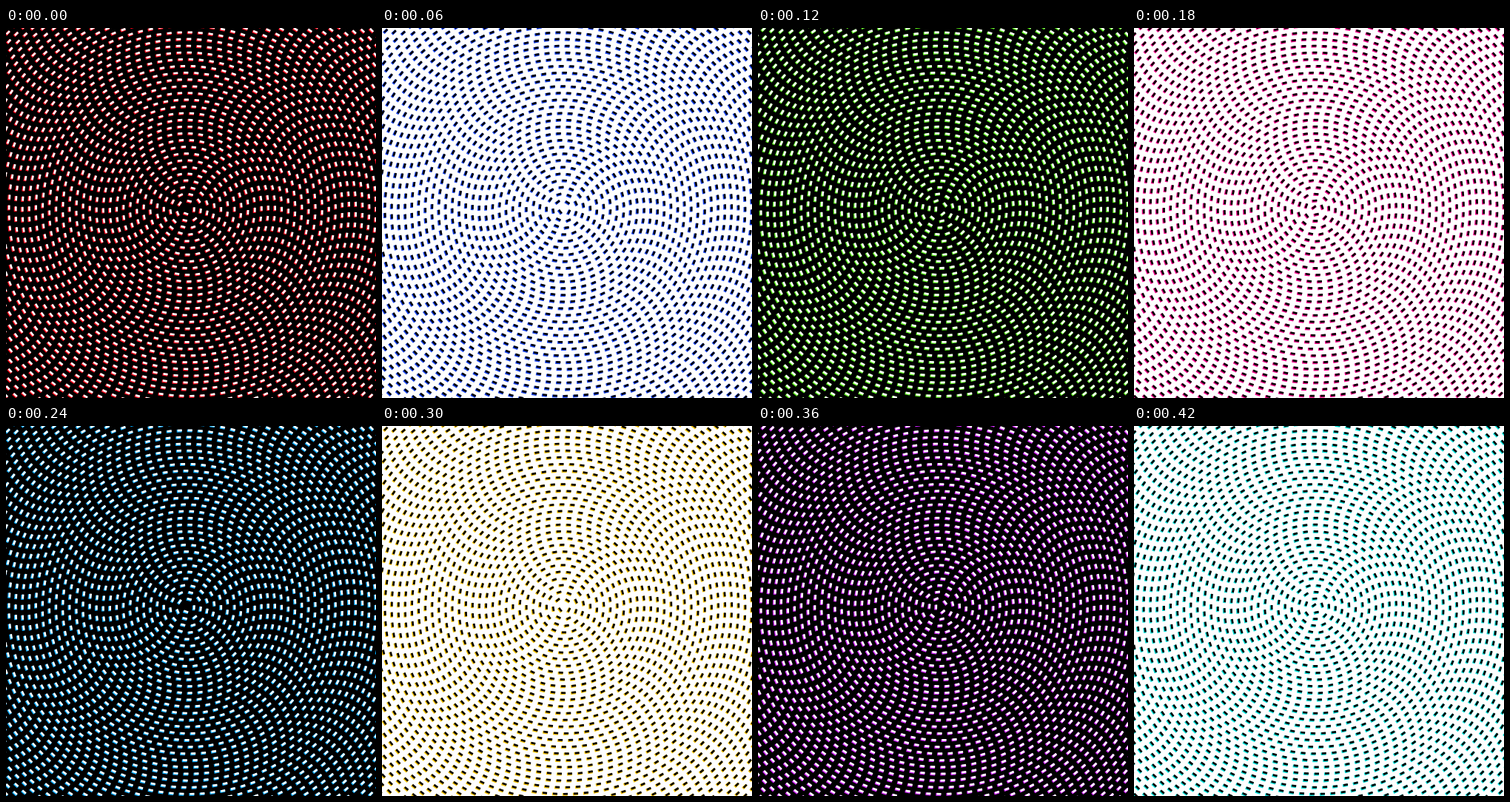
Animation of 500 by 500 pixels, one loop 480 ms. Source, as an HTML page with a canvas:

```html
<!DOCTYPE html>
<html lang="en">
<head>
<meta charset="utf-8">
<title>Dashed spiral</title>
<style>
  html, body { margin: 0; width: 100%; height: 100%; overflow: hidden; background: #000; }
  canvas { display: block; width: 500px; height: 500px; }
</style>
</head>
<body>
<canvas id="stage" width="500" height="500"></canvas>
<script>
const ctx = document.getElementById('stage').getContext('2d');
const CENTER = 245;
const PITCH = 9.1;          // distance between turns
const TURN_RATE = 0.7;      // dash k sits at 0.7 * sqrt(k) turns
const STEP_MS = 60;
const FRINGES = ['#ff0018', '#1a48ff', '#58f018', '#ff0090',
                 '#00a8ff', '#ffc800', '#d020ff', '#00e8e0'];

// The square root keeps the dashes evenly spaced along the spiral.
function spiralPath(phase, length) {
  const path = new Path2D();
  for (let k = 1; ; k++) {
    const turns = TURN_RATE * Math.sqrt(k + phase);
    const radius = PITCH * turns;
    if (radius > 375) return path;
    const angle = -2 * Math.PI * turns;
    const x = CENTER + radius * Math.cos(angle);
    const y = CENTER + radius * Math.sin(angle);
    const dx = -Math.sin(angle) * length / 2;
    const dy = Math.cos(angle) * length / 2;
    path.moveTo(x - dx, y - dy);
    path.lineTo(x + dx, y + dy);
  }
}

// Four positions, a quarter of a dash interval apart, moving clockwise.
const poses = [0, 1, 2, 3].map(i => ({
  fringe: spiralPath(-i / 4, 6.8),
  core: spiralPath(-i / 4, 6)
}));

function strokeDashes(path, color, width, shift) {
  ctx.save();
  ctx.translate(shift, -shift);
  ctx.strokeStyle = color;
  ctx.lineWidth = width;
  ctx.stroke(path);
  ctx.restore();
}

function draw(step) {
  const inverted = step % 2 === 1;
  const pose = poses[step % 4];
  ctx.fillStyle = inverted ? '#fff' : '#000';
  ctx.fillRect(0, 0, 500, 500);
  strokeDashes(pose.fringe, FRINGES[step], 3.7, -0.4);
  strokeDashes(pose.core, inverted ? '#000' : '#fff', 2.7, 0.3);
}

let shown = -1;
function frame() {
  const step = Math.floor(performance.now() / STEP_MS) % FRINGES.length;
  if (step !== shown) draw(shown = step);
  requestAnimationFrame(frame);
}
frame();
</script>
</body>
</html>
```
